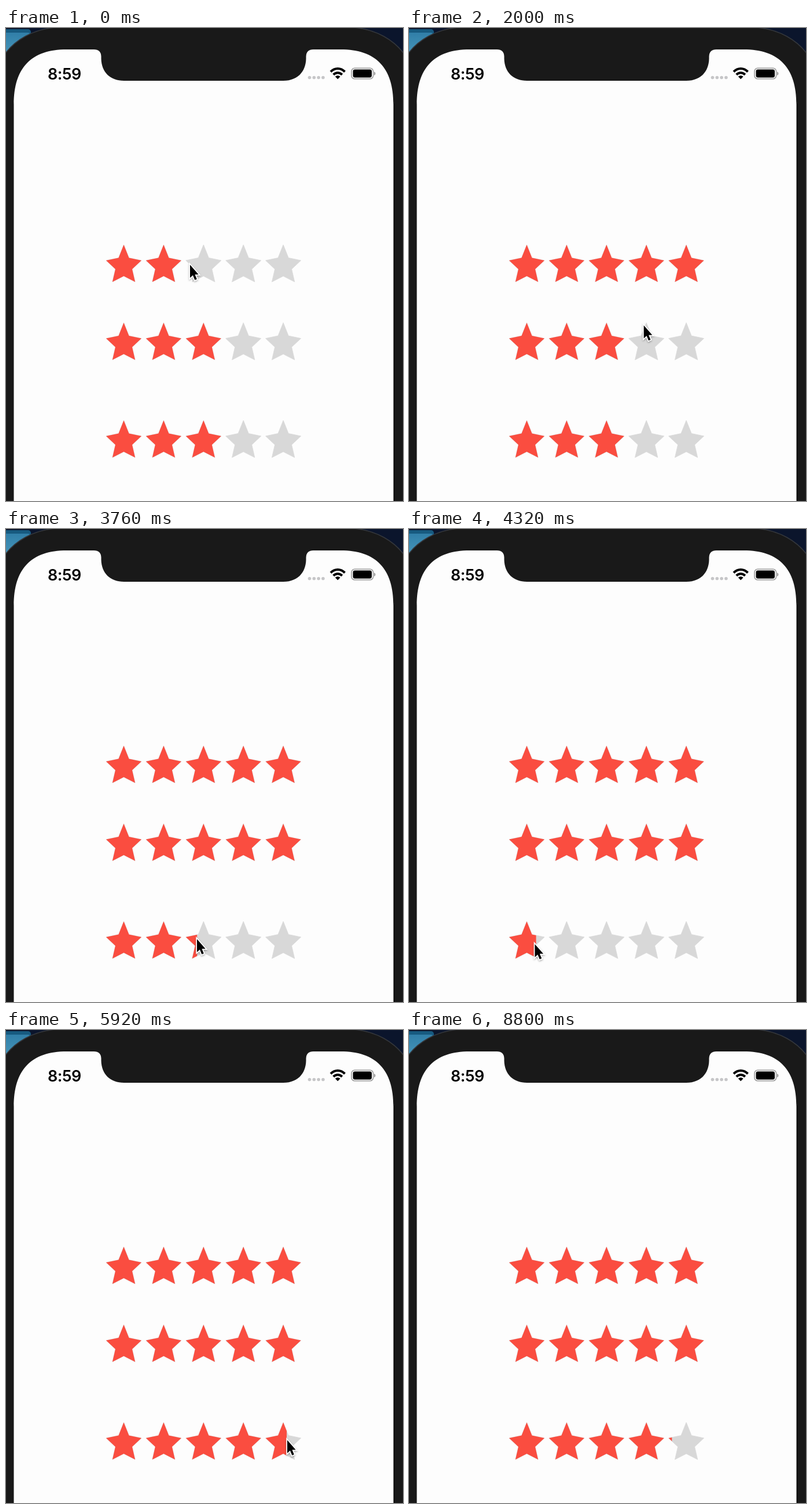
Write an HTML page that moves like this. It is 686 px wide and 816 px high and loops after 9040 ms.

```html
<!DOCTYPE html>
<html lang="en">
<head>
<meta charset="utf-8">
<title>Star rating</title>
<style>
  html, body { margin: 0; width: 100%; height: 100%; overflow: hidden; background: #0b152c; }
  svg { display: block; width: 686px; height: 816px; }
  text { font: 600 27px Inter, "Liberation Sans", sans-serif; letter-spacing: -.5px; }
</style>
</head>
<body>
<svg viewBox="0 0 686 816" xmlns="http://www.w3.org/2000/svg">
  <defs>
    <linearGradient id="sky" x2="0" y2="1">
      <stop offset="0" stop-color="#317fa8"/><stop offset="1" stop-color="#4f9fc2"/>
    </linearGradient>
    <filter id="soft" x="-50%" y="-50%" width="200%" height="200%">
      <feDropShadow dx="0" dy="1.5" stdDeviation="1.5" flood-opacity=".35"/>
    </filter>
    <path id="star" d="M0 0L9 22.5L30.5 27L14.5 42L19.6 64L0 54L-19.6 64L-14.5 42L-30.5 27L-9 22.5Z"/>
  </defs>

  <!-- desktop and phone body -->
  <rect width="686" height="816" fill="#0b152c"/>
  <rect x="-10" y="2" width="53" height="60" rx="5" fill="#175a80"/>
  <rect x="-10" y="8" width="51" height="54" rx="3" fill="url(#sky)"/>
  <path d="M-3 46C16 20 46 3 84 -1H602C640 3 670 20 689 46V820H-3Z" fill="#191919" stroke="#34373c" stroke-width="1.5"/>
  <path d="M670.500 130V816" stroke="#0b0b0b" stroke-width="2"/>
  <path d="M13.500 816V132C13.500 69 43 37 105 37H152Q164 37 164.500 49V53C165 76 180 91 204 91H479C503 91 518 76 518.500 53V49Q519 37 531 37H578C640 37 669.500 69 669.500 132V816Z" fill="#fdfdfd"/>

  <!-- status bar -->
  <text x="72" y="88.500">8:59</text>
  <g id="signal" fill="#c6c6c8"></g>
  <g fill="none" stroke="#000" stroke-width="4">
    <path d="M561 75.500C568 68.300 578.500 68.300 585.500 75.500"/>
    <path d="M565.700 80.500C570 76.200 576.500 76.200 580.800 80.500"/>
  </g>
  <path d="M568.800 83.800Q573.200 80.200 577.700 83.800L573.200 88.300Z"/>
  <rect x="597" y="69.200" width="37.500" height="18.600" rx="5.500" fill="none" stroke="#9b9b9b" stroke-width="1.600"/>
  <rect x="599.500" y="71.600" width="32.500" height="13.800" rx="3.400"/>
  <path d="M636 75.200Q638.400 76 638.400 78.500T636 81.800Z" fill="#9b9b9b"/>

  <g id="rows"></g>
  <path id="cursor" d="M1 2.500V25L5.900 20.600L9.300 28.700L12.800 27.200L9.400 19.200H15.700Z"
    stroke="#fff" stroke-width="3.400" paint-order="stroke" filter="url(#soft)"/>
</svg>
<script>
const LOOP = 9040, STEP = 80, LAG = 25;
const FIRST = 203.5, GAP = 68.9, LEFT = FIRST - GAP / 2;

// Each row follows the cursor from grab to drop, snapped up to its step (0 = free).
const ROWS = [
  { top: 374, stars: 2, step: 1, grab: 80, drop: 1200 },
  { top: 508.5, stars: 3, step: .5, grab: 2280, drop: 2720 },
  { top: 677, stars: 3, step: 0, grab: 3280, drop: 6960 }
];

// Cursor stops, eased in between: time, x, y
const STOPS = [
  [0, 317, 406], [80, 317, 406], [960, 465, 404], [1200, 465, 404],
  [1600, 462, 450], [2280, 372, 545], [2720, 493, 543.5], [2880, 493, 543.5],
  [3280, 505, 713], [3760, 329, 705], [4400, 212, 714], [5200, 488, 714],
  [5920, 485, 705], [6080, 485, 705], [6320, 472, 706], [6560, 490, 705],
  [6700, 490, 705], [7100, 441, 703], [7360, 455, 240], [7600, 629, 536],
  [7760, 629, 536], [8000, 679, 780], [8160, 679, 780], [8320, 720, 840]
];

const ease = u => (1 - Math.cos(Math.PI * u)) / 2;
const clamp = (v, lo, hi) => Math.min(hi, Math.max(lo, v));

function cursorAt(t) {
  const i = STOPS.findIndex(s => s[0] > t);
  if (i < 0) return STOPS.at(-1).slice(1);
  const [t0, x0, y0] = STOPS[i - 1], [t1, x1, y1] = STOPS[i];
  const u = ease((t - t0) / (t1 - t0));
  return [x0 + (x1 - x0) * u, y0 + (y1 - y0) * u];
}

function starsAt({ stars, step, grab, drop }, t) {
  if (t < grab) return stars;
  const value = (cursorAt(clamp(t - LAG, grab, drop))[0] - LEFT) / GAP;
  return step ? Math.ceil(value / step) * step : value;
}

const byId = id => document.getElementById(id);
const repeat = (n, fn) => Array.from({ length: n }, (_, i) => fn(i)).join("");
const starRow = y => repeat(5, i => `<use href="#star" x="${FIRST + GAP * i}" y="${y}"/>`);

byId("signal").innerHTML = repeat(4, i => `<circle cx="${524.5 + 7.8 * i}" cy="85.5" r="2.8"/>`);
byId("rows").innerHTML = ROWS.map(({ top }, i) => `
  <clipPath id="clip${i}"><rect id="fill${i}" x="${LEFT}" y="${top - 4}" height="74"/></clipPath>
  <g fill="#d8d8d8" stroke="#d8d8d8" stroke-width=".8">${starRow(top)}</g>
  <g fill="#fa4d40" clip-path="url(#clip${i})">${starRow(top)}</g>`).join("");

function draw(now) {
  const t = Math.floor((now % LOOP) / STEP) * STEP;
  ROWS.forEach((row, i) => byId("fill" + i).setAttribute("width", starsAt(row, t) * GAP));
  byId("cursor").setAttribute("transform", `translate(${cursorAt(t)})`);
}

const start = performance.now();
function tick() {
  draw(performance.now() - start);
  requestAnimationFrame(tick);
}
tick();
</script>
</body>
</html>
```
